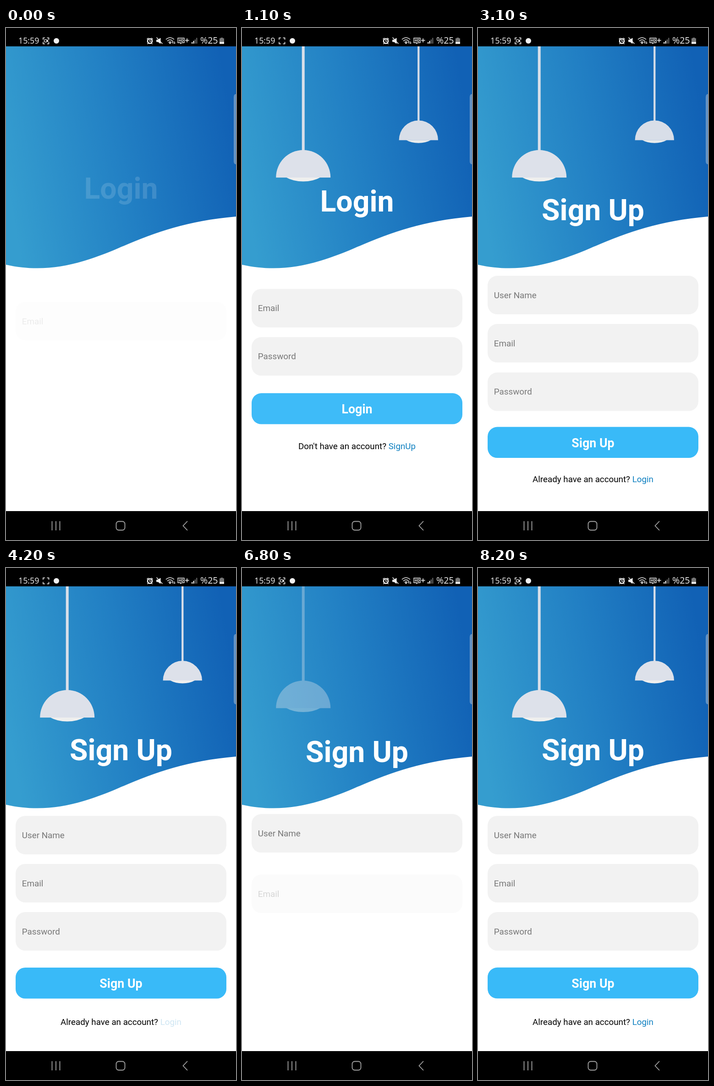
An HTML page that plays this animation: 502 by 1116 pixels, repeating every 8.3 s.

```html
<!DOCTYPE html>
<html lang="en">
<head>
<meta charset="utf-8">
<title>Login and sign up</title>
<style>
  html, body { margin: 0; width: 100%; height: 100%; overflow: hidden; background: #fff; }
  svg { display: block; width: 502px; height: 1116px; font-family: Roboto, "Liberation Sans", sans-serif; }
  .title { font-size: 64.3px; font-weight: 700; fill: #fff; text-anchor: middle; }
  .field rect { fill: #f2f2f2; }
  .field text { font-size: 18.8px; fill: #777; }
  .button rect { fill: #39baf8; }
  .button text { font-size: 26.8px; font-weight: 700; fill: #fff; text-anchor: middle; }
  .footer { font-size: 18.8px; fill: #000; text-anchor: middle; }
  .link { fill: #0f80c1; }
  .status { font-family: "Open Sans", "Noto Sans", sans-serif; fill: #f2f2f2; }
  .line { fill: none; stroke: #f2f2f2; stroke-width: 1.6; stroke-linecap: round; }
  .nav { fill: none; stroke: #a3a3a3; stroke-width: 1.8; }
</style>
</head>
<body>
<svg viewBox="0 0 502 1116">
  <defs>
    <linearGradient id="sky" gradientUnits="userSpaceOnUse" x1="0" y1="330" x2="502" y2="240">
      <stop offset="0" stop-color="#359dcf"/>
      <stop offset=".5" stop-color="#2280c4"/>
      <stop offset="1" stop-color="#1161b5"/>
    </linearGradient>
    <g id="lamp">
      <path d="M-3 0H3V228H-3Z" fill="#d9dfe9"/>
      <path d="M-37.5 285.5Q-22 294.5 0 294.5T37.5 285.5Z" fill="#efefee"/>
      <path d="M-59.5 286A59.5 60 0 0 1 59.5 286Z" fill="#dde1ea"/>
    </g>
  </defs>

  <rect width="502" height="1116" fill="#fff"/>
  <path d="M0 40V516C90 536 165 514 245 480S390 421 502 411V40Z" fill="url(#sky)"/>
  <g id="lamps">
    <g><use href="#lamp" transform="translate(133.7 40)"/></g>
    <g><use href="#lamp" transform="translate(385.3 40) scale(.718)"/></g>
  </g>
  <g id="login"></g>
  <g id="signup"></g>
  <path d="M502 144H501Q497 145 497 151V290Q497 296 501 297H502Z" fill="#b4c3d6" fill-opacity=".5"/>

  <rect width="502" height="40" fill="#000"/>
  <g class="status">
    <text x="27" y="34" font-size="17.8">15:59</text>
    <text x="424" y="34" font-size="19.6">%25</text>
    <circle cx="110" cy="28" r="6"/>
  </g>
  <g class="line">
    <path d="M81 25V21.5H84.5M90 21.5H93.5V25M93.5 31V34.5H90M84.5 34.5H81V31"/>
    <g id="camera" stroke-width="1.3">
      <rect x="83.5" y="25.3" width="5.5" height="5.4" rx="1"/>
      <path d="M89 27.5L91.3 26V30L89 28.5"/>
    </g>
    <circle cx="314" cy="28.5" r="5" stroke-width="2.6"/>
    <path d="M314 26V29H316M308 24L310.5 22M320 24L317.5 22M310 33.5L309 34.5M318 33.5L319 34.5"/>
    <path d="M329 26H332L337 22V34L332 30H329Z" fill="#f2f2f2" stroke-width="1"/>
    <path d="M329 21L341 34"/>
    <path d="M349.5 24.5Q358 17.5 366.5 24.5M352.5 28Q358 23.5 363.5 28M355.3 31Q358 29 360.7 31"/>
    <circle cx="358" cy="33" r="1"/>
    <path d="M364.5 34V29.5M363 31L364.5 29.5M367.5 29.5V34M369 32.5L367.5 34" stroke-width="1.2"/>
    <path d="M375 22H389V32H384L381 34V32H375Z" stroke-width="1.3"/>
    <path d="M378 24.5V29.5M381 24.5V29.5M378 27H381M383.5 24.5V29.5Q387 29.5 387 27T383.5 24.5" stroke-width="1.2"/>
    <path d="M391.5 27H399M395.2 23.3V30.7"/>
  </g>
  <path d="M405 31h2.2v3h-2.2zM408.4 28h2.2v6h-2.2z" fill="#f2f2f2"/>
  <path d="M411.8 25h2.2v9h-2.2zM415.2 21.5h2.2v12.5h-2.2z" fill="#666"/>
  <path d="M468.5 21H473.5V22.5H476V34.5H466V22.5H468.5Z" fill="#777"/>
  <rect x="466" y="30.5" width="10" height="4" fill="#f2f2f2"/>

  <rect y="1053" width="502" height="63" fill="#000"/>
  <g class="nav">
    <path d="M100.5 1075V1095M109 1075V1095M117.5 1075V1095"/>
    <rect x="240.5" y="1075.5" width="19" height="19" rx="5.5"/>
    <path d="M396 1075L386.5 1085L396 1095"/>
  </g>
</svg>
<script>
const LOOP = 8300, LAMP_STEP = 190, ROW_STEP = 205, TRAVEL = 32.7, FADE = 100;
const byId = id => document.getElementById(id);

const box = (top, height) => `<rect x="21" y="${top}" width="460" height="${height}" rx="21"/>`;
const title = (y, text) => `<text class="title" x="251" y="${y}">${text}</text>`;
const field = (top, text) =>
  `<g class="field">${box(top, 84)}<text x="34.8" y="${top + 48.6}">${text}</text></g>`;
const button = (top, text) =>
  `<g class="button">${box(top, 67.5)}<text x="251" y="${top + 44.2}">${text}</text></g>`;
const footer = (y, text, link) =>
  `<text class="footer" x="251" y="${y}">${text} <tspan class="link">${link}</tspan></text>`;

byId('login').innerHTML = title(400.3, 'Login') +
  field(568.8, 'Email') + field(673.8, 'Password') +
  button(795.2, 'Login') + footer(919.3, "Don't have an account?", 'SignUp');

byId('signup').innerHTML = title(419.3, 'Sign Up') +
  field(540.2, 'User Name') + field(645, 'Email') + field(750, 'Password') +
  button(871, 'Sign Up') + footer(995.5, 'Already have an account?', 'Login');

const lamps = [...byId('lamps').children];
const pages = {};
for (const name of ['login', 'signup']) {
  const root = byId(name);
  const [head, ...rows] = root.children;
  pages[name] = { root, head, rows, link: root.querySelector('.link') };
}

// "base" is when the entrance starts; going back shows a page already at rest
const scenes = [
  { page: 'login', at: 0, base: -58 },
  { page: 'signup', at: 1950, base: 1950 },
  { page: 'login', at: 4250, base: -LOOP, back: true },
  { page: 'signup', at: 6505, base: 6505 }
];

const clamp = v => Math.max(0, Math.min(1, v));

// Spring with stiffness 100, damping 10, mass 1
function spring(ms) {
  if (ms <= 0) return 0;
  const s = ms / 1000, w = Math.sqrt(75);
  return 1 - Math.exp(-5 * s) * (Math.cos(w * s) + 5 / w * Math.sin(w * s));
}

function enter(el, ms, from) {
  const p = spring(ms);
  el.setAttribute('transform', `translate(0 ${(from * TRAVEL * (1 - p)).toFixed(2)})`);
  el.setAttribute('opacity', clamp(p).toFixed(3));
}

function posePage({ head, rows }, ms) {
  enter(head, ms, -1);
  rows.forEach((row, i) => enter(row, ms - i * ROW_STEP, 1));
}

function draw(t) {
  const i = scenes.findLastIndex(s => t >= s.at);
  const scene = scenes[i], next = scenes[i + 1];
  const shown = scene.back ? clamp((t - scene.at) / FADE) : 1;
  const ms = t - scene.base;

  lamps.forEach((lamp, n) => enter(lamp, ms - (n + 1) * LAMP_STEP, -1));
  posePage(pages[scene.page], ms);
  for (const name in pages) {
    pages[name].root.setAttribute('opacity', name === scene.page ? shown : 1 - shown);
  }

  const press = next ? clamp((t - next.at + 200) / 150) : 0;
  pages[scene.page].link.setAttribute('fill-opacity', 1 - .8 * press);
  byId('camera').setAttribute('opacity', (t + 200) % 1600 < 800 ? 1 : 0);
}

const start = performance.now();
function tick() {
  draw((performance.now() - start) % LOOP);
  requestAnimationFrame(tick);
}
tick();
</script>
</body>
</html>
```
